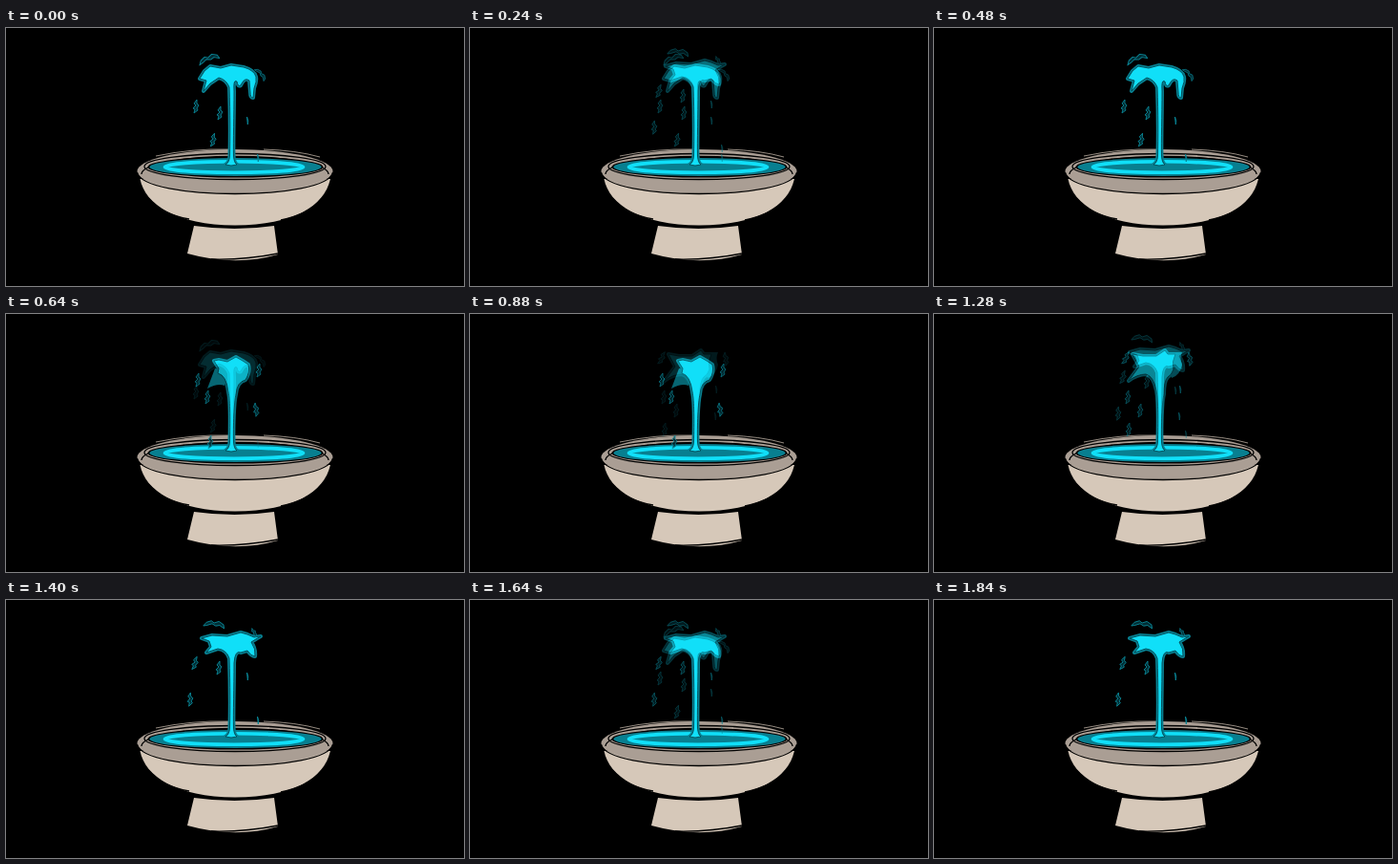
Animation of 480 by 270 pixels, one loop 1920 ms. Source, as an HTML page:

```html
<!DOCTYPE html>
<html>
<head>
<meta charset="utf-8">
<style>
  html, body { margin: 0; width: 100%; height: 100%; overflow: hidden; background: #000; }
  svg { display: block; width: 100vw; height: 100vh; }
  #water { isolation: isolate; }
  #water > g { mix-blend-mode: plus-lighter; }
  .line { fill: none; stroke: #000; stroke-width: 1.3; }
  .sketch { fill: none; stroke: #d6c8b9; stroke-width: .7; }
  .shade { fill: #087f90; }
  .edge { fill: none; stroke: #087f90; stroke-width: 4; stroke-linejoin: round; }
  .jet { fill: #10dff8; stroke: #034853; stroke-width: .9; stroke-linejoin: round; }
  .drop { fill: #022d34; stroke: #0a8798; stroke-width: .9; stroke-linejoin: round; }
</style>
</head>
<body>
<svg viewBox="0 0 480 270">
  <defs>
    <path id="drop" d="M1-7 L-2-3 0-1-3 2-1 3-2 7 2 4 1 2 3-1 1-3Z"/>
    <path id="sliver" d="M-.5-4 L.8 0 .3 4Z"/>
    <path id="arc" d="M-11 3 L-8-1-3-3 0-1 5-3 10 0 11 4 6 1 2 2-2 0-7 2Z"/>
  </defs>

  <!-- foot and bowl -->
  <path d="M197 207 Q240 213 281 207 L285 237 Q240 250 190 236Z" fill="#d6c8b9"/>
  <path class="line" d="M215 242 Q250 243 285 236" stroke-width="1"/>
  <path d="M140.500 158 C146 185 178 206 240 206.500 C302 206 333 187 340 158Z" fill="#d6c8b9"/>
  <path class="line" d="M149 178 C160 191 174 197 192 200 M288 201 C308 197 322 190 331 178" stroke-width=".8"/>

  <!-- rim -->
  <ellipse cx="240" cy="150" rx="102.500" ry="23" fill="#aa9e94"/>
  <path class="line" d="M137.500 151 C143 181 337 181 342.500 151" stroke-width="1.800"/>
  <path class="line" d="M142 153 A98 18.500 0 0 1 338 153" stroke-width="1.600"/>
  <ellipse class="line" cx="240" cy="145" rx="95" ry="13.500" stroke-width="1.600"/>
  <path class="sketch" d="M157 134 Q195 126 233 127 M270 127 Q304 128 329 135"/>

  <!-- pool -->
  <ellipse cx="240.500" cy="145.500" rx="92" ry="11"/>
  <ellipse cx="240.500" cy="145.500" rx="90" ry="9.500" fill="#087f90"/>
  <ellipse cx="239" cy="145.500" rx="72.500" ry="5.700" fill="none" stroke="#10dff8" stroke-width="3.600"/>
  <g id="water"></g>
</svg>
<script>
const stem = 'C239 92 238 118 238.500 134 Q239 141 242 143 Q236 145 230 143 Q234 141 234.500 134 C235 114 235 90 ';

// Each drop: kind, x, y, rotation, size
const poses = {
  high: {
    head: `M203 53 L208 45 214 40 225 42 236 39 249 41 Q260 44 262 51 Q263 56 260 63 L259 73 Q256 73 256 67 L255 55 Q250 51 246 60 Q243 62 242 56 Q238 53 239 66 ${stem}234 62 Q231 54 223 52 L214 58 207 66 210 55Z`,
    drops: [['arc', 212, 32, -22], ['arc', 267, 48, 48, .7], ['drop', 199, 82, 0], ['drop', 224, 89, 0], ['drop', 217, 117, 5], ['sliver', 253, 97, 0], ['sliver', 264, 136, 0]]
  },
  low: {
    shade: 'M219 57 L211 78 Q222 72 229 75 L231 58Z',
    head: `M218 49 L223 48 232 50 241 45 248 49 254 53 Q256 61 251 69 Q242 71 241 84 ${stem}233 82 Q231 64 222 62 L223 57Z`,
    drops: [['drop', 265, 59, 0], ['drop', 262, 100, -15], ['drop', 201, 69, 0], ['drop', 211, 87, 0], ['drop', 214, 134, 0]]
  },
  mid: {
    shade: 'M250 40 L260 40 Q257 46 260 53 Q258 64 249 67Z',
    head: `M204 70 L215 55 208 42 219 44 233 44 242 38 245 42 253 42 Q249 50 251 58 Q249 64 245 66 Q241 70 241 84 ${stem}233 80 Q230 65 222 63 Q213 63 204 70Z`,
    drops: [['drop', 201, 46, 20], ['drop', 268, 47, -15], ['drop', 203, 87, 0], ['drop', 216, 101, 0], ['drop', 204, 121, 0], ['sliver', 258, 79, 0], ['sliver', 257, 107, 0]]
  },
  wide: {
    head: `M205 40 L216 37 232 38 246 34 253 36 260 39 267 38 Q260 42 257 44 Q262 51 261 59 Q257 59 253 53 L246 55 Q240 52 239 66 ${stem}234 61 Q231 52 222 51 L210 55 215 49 213 43Z`,
    drops: [['arc', 218, 25, 5], ['drop', 260, 34, -35, .7], ['drop', 198, 66, 10], ['drop', 223, 71, 0], ['drop', 193, 104, -5], ['sliver', 253, 80, 0], ['sliver', 264, 126, 0]]
  }
};

const water = document.getElementById('water');
const ns = 'http://www.w3.org/2000/svg';
for (const pose of Object.values(poses)) {
  pose.node = document.createElementNS(ns, 'g');
  pose.node.innerHTML =
    `<path class="shade" d="${pose.shade || ''}"/>
     <path class="edge" d="${pose.head}"/><path class="jet" d="${pose.head}"/>` +
    pose.drops.map(([kind, x, y, turn, size = 1]) =>
      `<use href="#${kind}" class="drop" transform="translate(${x} ${y}) rotate(${turn}) scale(${size})"/>`).join('');
  water.append(pose.node);
}

// Start, length, pose; zero length is a cut
const cues = [
  [0, 0, 'high'], [80, 0, 'wide'], [160, 160, 'high'], [480, 200, 'low'],
  [840, 200, 'mid'], [1200, 200, 'wide'], [1560, 200, 'high'], [1840, 0, 'wide']
];

function draw(now) {
  const time = Math.floor((now % 1920) / 40) * 40;
  const i = cues.findLastIndex(cue => cue[0] <= time);
  const [start, length, name] = cues[i];
  const mix = length ? Math.min(1, (time - start) / length) : 1;
  for (const key in poses) {
    const before = i && key === cues[i - 1][2];
    poses[key].node.style.opacity = key === name ? mix : before ? 1 - mix : 0;
  }
}

const origin = performance.now();
function tick() {
  draw(performance.now() - origin);
  requestAnimationFrame(tick);
}
tick();
</script>
</body>
</html>
```
